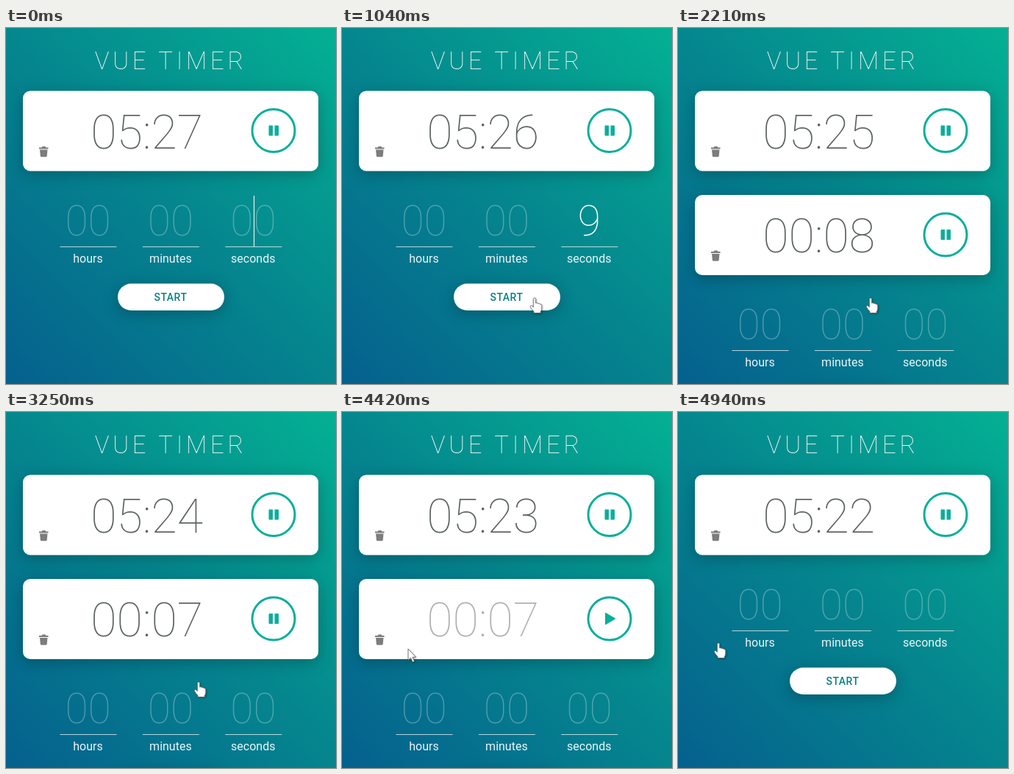
Animation, 449 px wide and 484 px high, one loop 5.33 s. Source, as an HTML page:

```html
<!DOCTYPE html>
<html lang="en">
<head>
<meta charset="utf-8">
<title>Vue Timer</title>
<style>
  html, body { margin: 0; width: 100%; height: 100%; overflow: hidden; }
  svg { display: block; width: 449px; height: 484px; background: linear-gradient(45deg, #05608e, #05878e 52%, #04b093); }
  text { font-family: Roboto, sans-serif; text-anchor: middle; fill: #fff; }
  .title { font-size: 33px; font-weight: 100; letter-spacing: 4.7px; }
  .panel { fill: #fff; filter: drop-shadow(0 4px 10px rgba(0, 0, 0, .25)); }
  .time { font-size: 64.6px; font-weight: 100; fill: #5c6262; }
  .digits { font-size: 57px; font-weight: 100; }
  .label { font-size: 16px; font-weight: 400; fill-opacity: .92; }
  .start { font-size: 14px; font-weight: 500; letter-spacing: .5px; fill: #0b7f80; }
  .ring { fill: none; stroke: #0bae9a; stroke-width: 3; }
  .icon { fill: #0bae9a; }
  .trash { fill: #7d7d7d; }
  .line { stroke: #fff; stroke-opacity: .7; }
  .cursor { fill: #fff; stroke: #555; stroke-width: .8; stroke-linejoin: round; filter: drop-shadow(1px 1px 1px rgba(0, 0, 0, .3)); }
</style>
</head>
<body>
<svg viewBox="0 0 449 484">
  <defs>
    <g id="base">
      <rect class="panel" x="23" width="402" height="109" rx="10"/>
      <circle class="ring" cx="364" cy="54" r="29"/>
      <path class="trash" d="M45 77h3.500l1-1.500h4l1 1.500H57.500v2H45zM46 80h10.500l-.8 8.500q-.2 1.200-1.200 1.200h-6.500q-1 0-1.200-1.200z"/>
    </g>
    <path id="pause" class="icon" d="M358.500 47h4.500v14h-4.500q-1 0-1-1v-12q0-1 1-1zM365.500 47h4.500q1 0 1 1v12q0 1-1 1h-4.500z"/>
    <path id="play" class="icon" d="M358 46.500q0-1 1-.5l12.500 7.300q1 .7 0 1.400L359 62q-1 .5-1-.5z"/>
  </defs>
  <text class="title" x="224.300" y="56">VUE TIMER</text>
  <g transform="translate(0 85.5)">
    <use href="#base"/><use href="#pause"/>
    <text class="time" id="mainTime" x="191.700" y="78"></text>
  </g>
  <g id="second" transform="translate(0 227)">
    <use href="#base"/><use id="toggle" href="#pause"/>
    <text class="time" id="secondTime" x="191.700" y="78"></text>
  </g>
  <g id="form">
    <g id="fields"></g>
    <path id="caret" stroke="#fff"/>
    <rect class="panel" x="152" y="347.500" width="145" height="36.500" rx="18.250"/>
    <text class="start" x="224" y="370.500">START</text>
  </g>
  <path id="arrow" class="cursor" d="M0 0V15.500l3.500-3.300L6 18l2.500-1.100L6 11.300H10.500z"/>
  <path id="hand" class="cursor" d="M-1.700 1.500Q-1.500 0 0 0T1.700 1.500V7q1.500-1 2.800.6 1.600-.8 2.700.7 2.500-.4 2.600 2V14.500q0 2-1.500 4v2H-1V18.500Q-4 15.500-5.600 12.500q-.6-2 1.200-2.200 1.400.2 2.700 2.200z"/>
</svg>
<script>
const LOOP = 5330, STEP = 130;
const ADDED = 1170, PAUSED = 4160, REMOVED = 4940;
const $ = id => document.getElementById(id);
const clock = s => [s / 60, s % 60].map(n => String(Math.floor(n)).padStart(2, '0')).join(':');
const show = (el, on) => el.setAttribute('visibility', on ? 'visible' : 'hidden');
const move = (el, x, y) => el.setAttribute('transform', `translate(${x} ${y})`);

$('fields').innerHTML = ['hours', 'minutes', 'seconds'].map((name, i) => {
  const x = 112 + 112.4 * i;
  return `<text class="digits" id="${name}" x="${x - .4}" y="282" opacity=".28">00</text>
    <path class="line" d="M${x - 38.5} 297.5h77"/>
    <text class="label" x="${x - .5}" y="319">${name}</text>`;
}).join('');

// Pointer stops: arrive, leave, x, y. It is a hand while it rests.
const stops = [
  [780, 780, 337, 262], [1040, 3380, 262, 367], [3770, 3770, 358, 313],
  [3900, PAUSED, 363, 287], [4420, 4420, 90, 322], [4680, LOOP, 55, 314]
];

function drawPointer(t) {
  const i = stops.findLastIndex(stop => stop[0] <= t);
  const visible = t > stops[0][0];
  const [arrive, leave, x, y] = stops[Math.max(i, 0)];
  const resting = t <= leave && leave > arrive;
  show($('hand'), visible && resting);
  show($('arrow'), visible && !resting);
  const next = stops[i + 1] || stops[i];
  const f = t <= leave ? 0 : (t - leave) / (next[0] - leave);
  for (const id of ['hand', 'arrow']) move($(id), x + (next[2] - x) * f, y + (next[3] - y) * f);
}

function draw(now) {
  const t = Math.floor(now % LOOP / STEP) * STEP;
  const open = t >= ADDED && t < REMOVED;
  const typed = t >= 390 && t < ADDED;
  const paused = t >= PAUSED;

  $('mainTime').textContent = clock(327 - Math.floor((t + 510) / 1000));
  $('secondTime').textContent = clock(9 - Math.floor(Math.max(0, Math.min(t, PAUSED) - ADDED) / 1000));
  $('secondTime').setAttribute('opacity', paused ? .5 : 1);
  $('toggle').setAttribute('href', paused ? '#play' : '#pause');
  show($('second'), open);
  move($('form'), 0, open ? 141 : 0);

  $('seconds').textContent = typed ? '9' : '00';
  $('seconds').setAttribute('opacity', typed ? 1 : .28);
  $('caret').setAttribute('d', `M${typed ? 350.5 : 337.5} 228V297`);
  show($('caret'), t < 910);
  drawPointer(t);
  requestAnimationFrame(() => draw(performance.now()));
}
draw(0);
</script>
</body>
</html>
```
